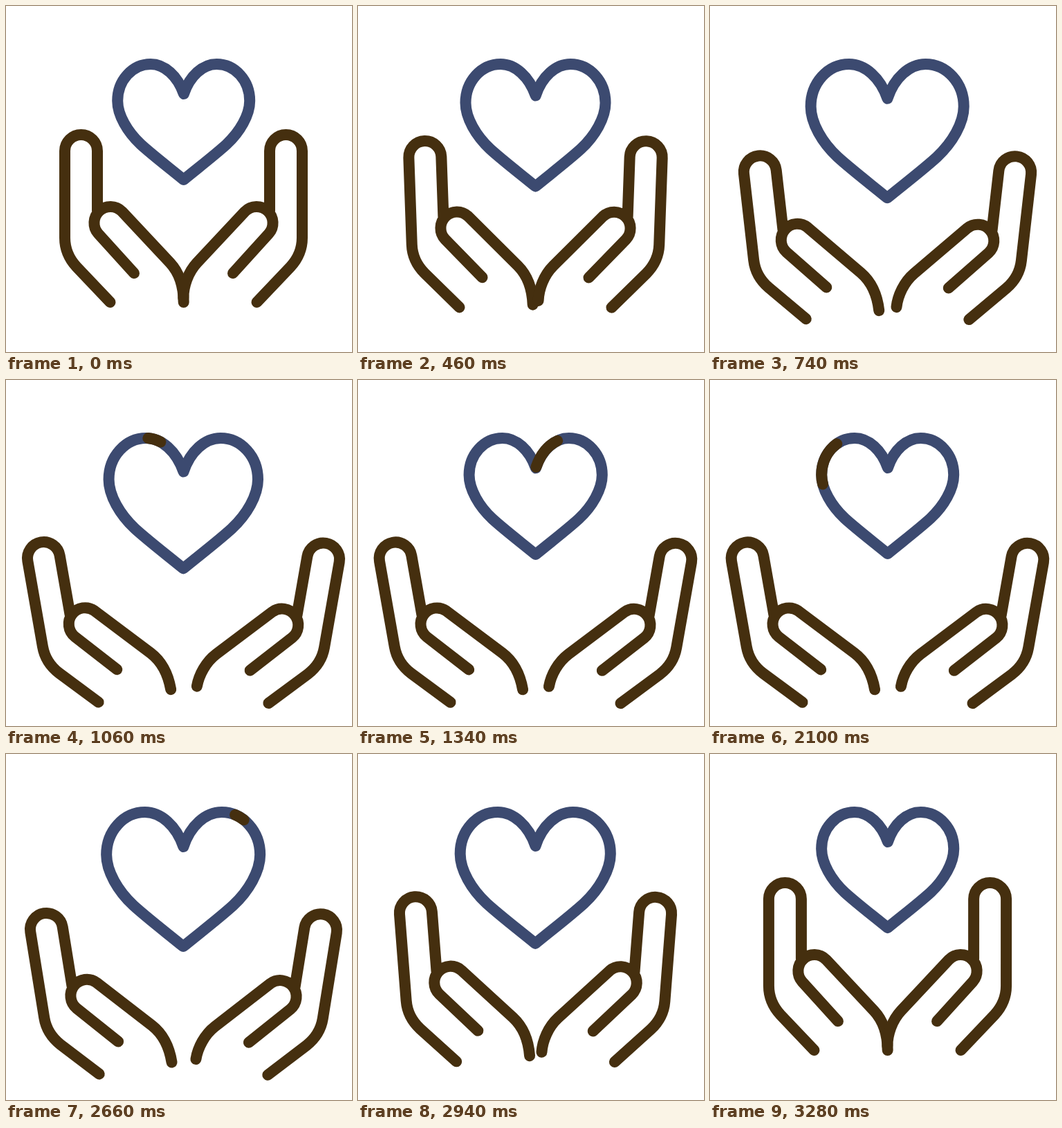
These frames come from a looping animation (500 px wide and 500 px high, 3.62 s). An HTML page:

```html
<!DOCTYPE html>
<html lang="en">
<head>
<meta charset="utf-8">
<title>Caring hands</title>
<style>
  html, body { margin: 0; width: 100%; height: 100%; overflow: hidden; background: #fff; }
  svg { display: block; width: 100%; height: 100%; }
  path { fill: none; stroke: #452f0f; stroke-width: 16; stroke-linecap: round; stroke-linejoin: round; }
  #outline { stroke: #3c4a70; }
</style>
</head>
<body>
<svg viewBox="0 0 500 500">
  <g id="heart">
    <path id="outline"/>
    <path id="glint" pathLength="603"/>
  </g>
  <path id="left"/>
  <g transform="translate(513) scale(-1 1)"><path id="right"/></g>
</svg>
<script>
const LOOP = 3620, STEP = 20, PERIMETER = 603;
const [heart, outline, glint, left, right] =
  ['heart', 'outline', 'glint', 'left', 'right'].map(id => document.getElementById(id));

// Clockwise from the dip
const heartPath = `M256.9 127C265.4 101 284.4 84 304.4 84
  C330.9 84 352.2 107.7 352.2 137C352.2 157.5 338 182 318.6 200
  C301 216 277.4 234 256.7 251C236 234 212.4 216 194.8 200
  C175.4 182 161.2 157.5 161.2 137C161.2 107.7 182.5 84 209 84C229 84 248 101 256.9 127Z`;
outline.setAttribute('d', heartPath);
glint.setAttribute('d', heartPath);

const handPath = wristY => `M150.5 428L102 377C90 364 85 351 85 335
  V209.5a23.5 23.5 0 0 1 47 0V296
  M185 386L133.3 329A23.5 23.5 0 0 1 167.7 297L237 371C250 385 256.7 405 256.7 ${wristY}`;
left.setAttribute('d', handPath(428));
right.setAttribute('d', handPath(422));

// Smooth 0 to 1 between two steps
function ease(n, from, to) {
  const u = Math.min(1, Math.max(0, (n - from) / (to - from)));
  return u * u * (3 - 2 * u);
}

const beat = (n, start) => ease(n, start, start + 34) - ease(n, start + 34, start + 60);

function draw(n) {
  const angle = -10 * (ease(n, 10, 55) - ease(n, 126, 165));
  left.setAttribute('transform', `rotate(${angle} 358 544)`);
  right.setAttribute('transform', `rotate(${angle} 366 544.7)`);

  const scale = 1 + 0.177 * (beat(n, 10) + beat(n, 105));
  heart.setAttribute('transform', `translate(260 84) scale(${scale}) translate(-260 -84)`);
  outline.style.strokeWidth = glint.style.strokeWidth = 16 / scale;

  const head = -68 + 770 * ease(n, 44.6, 134.6);
  const tail = -68 + 770 * ease(n, 50.4, 140);
  const length = head - tail;
  glint.style.display = length > 0.1 ? '' : 'none';
  glint.style.strokeDasharray = `${length} ${PERIMETER - length}`;
  glint.style.strokeDashoffset = -tail;
}

const begin = performance.now();
function tick() {
  draw(Math.floor((performance.now() - begin) % LOOP / STEP));
  requestAnimationFrame(tick);
}
tick();
</script>
</body>
</html>
```
